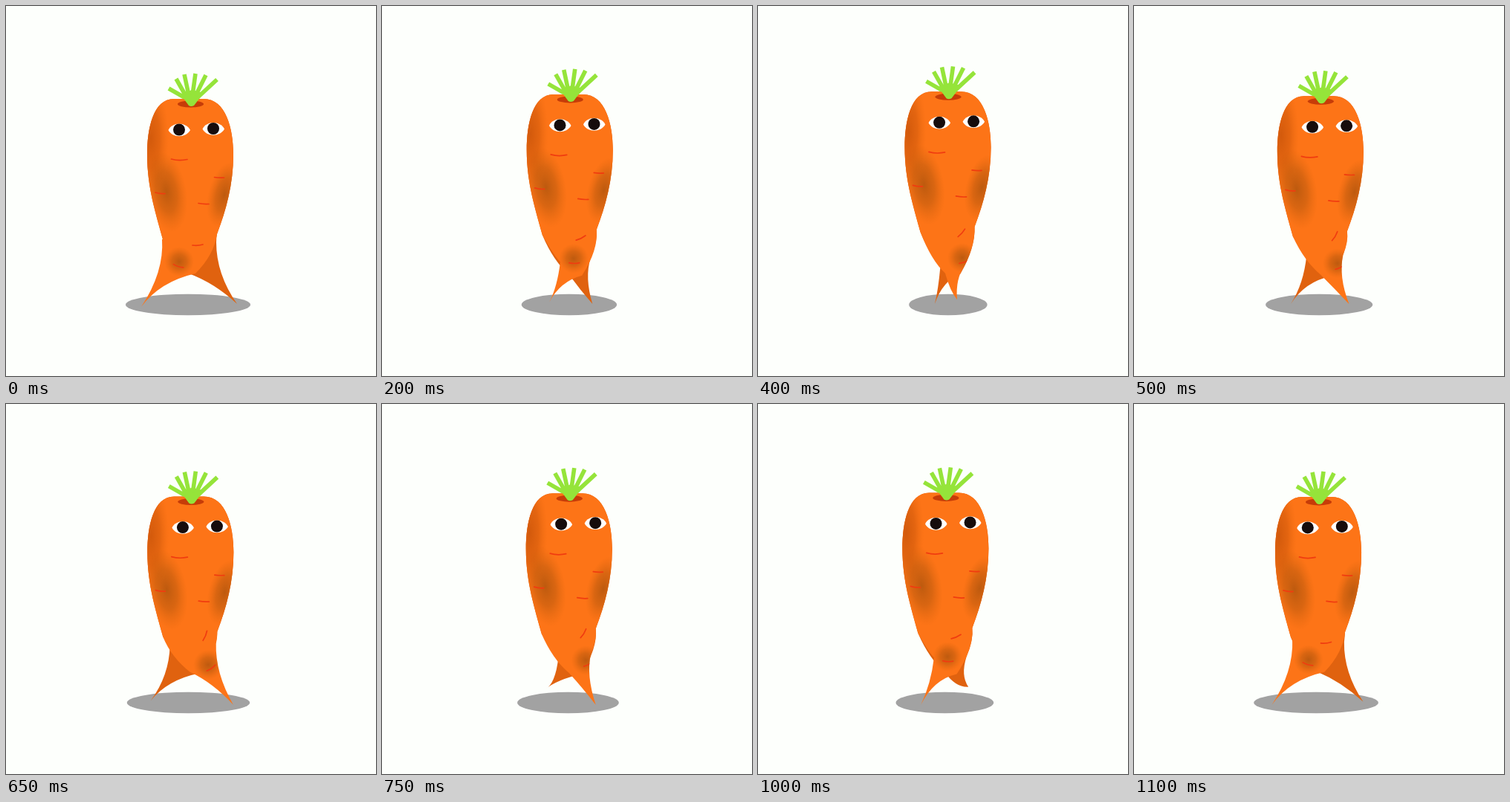
An HTML page that plays this animation: 498x498 px, repeating every 1.15 s.

```html
<!DOCTYPE html>
<html lang="en">
<head>
<meta charset="utf-8">
<title>Walking carrot</title>
<style>
  html, body { margin: 0; width: 100%; height: 100%; overflow: hidden; background: #fdfffc; }
  svg { display: block; width: 100vw; height: 100vh; }
  .mark { fill: none; stroke: #f03c10; stroke-width: 1.7; stroke-linecap: round; }
  .leaf { fill: none; stroke: #95e43a; stroke-width: 5.6; }
</style>
</head>
<body>
<svg viewBox="0 0 498 498">
  <defs>
    <clipPath id="clip"><path id="clipShape"/></clipPath>
    <radialGradient id="brown">
      <stop offset="0" stop-color="#8a4508" stop-opacity=".55"/>
      <stop offset=".5" stop-color="#9a4c08" stop-opacity=".36"/>
      <stop offset="1" stop-color="#c05a08" stop-opacity="0"/>
    </radialGradient>
    <radialGradient id="rust">
      <stop offset="0" stop-color="#bc4c06" stop-opacity=".65"/>
      <stop offset=".5" stop-color="#c45208" stop-opacity=".45"/>
      <stop offset="1" stop-color="#e0640c" stop-opacity="0"/>
    </radialGradient>
  </defs>

  <ellipse id="shadow" cy="402" ry="14.3" fill="#a2a2a2"/>
  <path id="far" fill="#e0620f"/>
  <path id="near" fill="#fd7417"/>

  <g clip-path="url(#clip)">
    <g class="bob">
      <ellipse cx="195" cy="178" rx="24" ry="78" fill="url(#rust)"/>
      <ellipse cx="216" cy="250" rx="27" ry="55" fill="url(#brown)" transform="rotate(-10 216 250)"/>
      <ellipse cx="294" cy="254" rx="22" ry="45" fill="url(#brown)" transform="rotate(14 294 254)"/>
      <g id="knee">
        <circle cx="-1" cy="-6" r="20" fill="url(#brown)"/>
        <path class="mark" d="M-7 0Q0 1.500 7 -.5"/>
      </g>
      <path id="thigh" class="mark" d="M-7 0Q0 1 7 -1"/>
    </g>
  </g>

  <g class="bob">
    <path class="mark" d="M222.500 206Q233 209 244 206.500"/>
    <path class="mark" d="M201 251Q208 253 214 252.500"/>
    <path class="mark" d="M280.500 230.500Q287 231.500 293.500 231"/>
    <path class="mark" d="M259 265.500Q266 267 273 266.500"/>
    <ellipse cx="248.500" cy="132" rx="17.500" ry="4.500" fill="#c63c08"/>
    <path fill="#95e43a" d="M235 119L246 134Q249 136 253 134L266 117L250 113Z"/>
    <path class="leaf" d="M240 123L219 111M242 121L229 98M246 120L240 92M251 120L255 91M255 121L269 93M258 123L284 99"/>
    <g id="eyes">
      <g id="eye">
        <path d="M218.500 167C224 155.500 242 155.500 248 167C242 178 224 178 218.500 167Z" fill="#fff"/>
        <circle cx="233" cy="166.500" r="8" fill="#160c0c"/>
      </g>
      <use href="#eye" x="46" y="-1.500"/>
    </g>
  </g>
</svg>
<script>
const LOOP = 1150, STEP = 50;
const SWING = 600, STANCE = 510;   // near leg: swing forward, then push back (the rest is a hold)
const BOB = 11;
const el = id => document.getElementById(id);

// Outline of a leg with its foot left, centred and right:
// right thigh, crotch, calf, [foot], calf, left hip, left thigh
const LEFT  = [280, 335, 255, 360, 207, 371, 213, 358, 210, 314, 210, 314];
const MID   = [293, 322, 277, 353, 261, 368, 254, 384, 251, 358, 234, 342];
const RIGHT = [283, 312, 283, 318, 283, 361, 281, 373, 246, 360, 220, 340];
const CENTRE = .6;

// Parabola through the three poses; f runs from 0 (left) to 1 (right).
function legPose(f) {
  const l = (f - CENTRE) * (f - 1) / CENTRE;
  const r = f * (f - CENTRE) / (1 - CENTRE);
  return LEFT.map((v, i) => l * v + (1 - l - r) * MID[i] + r * RIGHT[i]);
}

function bodyPath(dx, dy, f, footY) {
  const p = (x, y) => `${x + dx} ${y + dy} `;
  const leg = legPose(f);
  return `M${p(211, 314)}C${p(202, 280)}${p(190, 245)}${p(190, 200)}` +
    `C${p(190, 165)}${p(198, 125)}${p(226, 125)}L${p(266, 125)}` +
    `C${p(296, 125)}${p(306, 165)}${p(306, 200)}` +
    `C${p(306, 240)}${p(296, 275)}${p(284, 307)}` +
    `Q${leg.slice(0, 6).join(" ")} ${182 + 129 * f} ${footY} ` +
    `${leg.slice(6).join(" ")} ${p(211, 314)}Z`;
}

function place(id, x, y, angle = 0) {
  el(id).setAttribute("transform", `translate(${x} ${y}) rotate(${angle})`);
}

function draw(t) {
  const nearSwings = t < SWING;
  const u = nearSwings ? t / SWING : Math.min(1, (t - SWING) / STANCE);
  const rise = Math.sin(Math.PI * u ** 1.2) ** 2;
  const lift = BOB * rise, dx = .78 * lift;

  const swing = u, stance = 1 - u ** 1.4;
  const f = nearSwings ? swing : stance;
  const body = bodyPath(dx, -lift, f, 405 - (nearSwings ? 11 * rise : 0));
  el("near").setAttribute("d", body);
  el("clipShape").setAttribute("d", body);
  el("far").setAttribute("d", nearSwings
    ? bodyPath(dx, -lift, stance, 401)
    : bodyPath(dx, -lift, swing, 401 - 40 * rise));

  el("shadow").setAttribute("cx", 245 + 1.13 * lift);
  el("shadow").setAttribute("rx", 84 - 3.25 * lift);
  document.querySelectorAll(".bob").forEach(g => g.setAttribute("transform", `translate(${dx} ${-lift})`));

  const reach = Math.sin(f * Math.PI / 2);
  place("eyes", 4.6 * Math.sin(Math.PI * (t / LOOP) ** 1.2), 0);
  place("thigh", 258 + 10 * reach, 322 - 10 * f, -66 * f);
  place("knee", 232 + 44 * reach, 350 + 6 * f, 20 - 55 * f);
}

const start = performance.now();
function tick(now) {
  const t = Math.max(0, now - start) % LOOP;
  draw(Math.floor(t / STEP) * STEP);
  requestAnimationFrame(tick);
}
draw(0);
requestAnimationFrame(tick);
</script>
</body>
</html>
```
